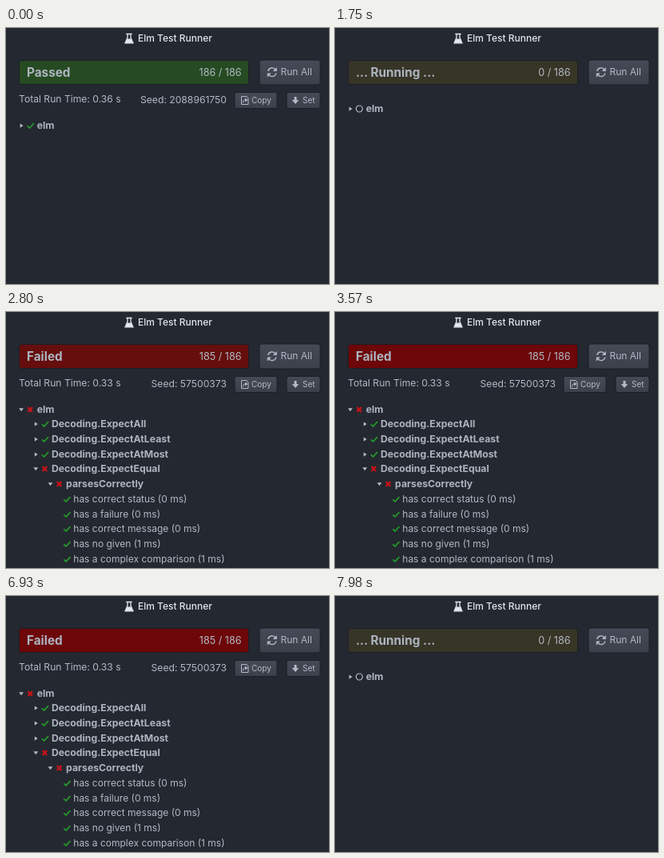
Recreate the animation shown at these times as an HTML page. Size 404 px wide and 320 px high, loop 8 s.

```html
<!DOCTYPE html>
<html lang="en">
<head>
<meta charset="utf-8">
<title>Elm Test Runner</title>
<style>
  html, body { margin: 0; width: 100%; height: 100%; overflow: hidden; background: #242830; }
  svg { display: block; width: 404px; height: 320px; }
  text { font: 12px Inter, sans-serif; fill: #b3b9c5; white-space: pre; }
  .bold { font-size: 12.25px; font-weight: 700; fill: #adb4c0; }
  .status { font-size: 15.3px; font-weight: 700; fill: #adb4c0; }
  .count { font-size: 12.6px; }
  .info { font-size: 12.15px; }
  .small { font-size: 10px; }
  .end { text-anchor: end; }
  .line { fill: none; stroke: #b3b9c5; stroke-width: 1.4; }
  .fill { fill: #b3b9c5; }
  .btn, #bar { stroke: #1b1e25; stroke-width: 1; }
  .btn { fill: url(#face); }
  .pass { fill: none; stroke: #24982b; stroke-width: 1.8; }
  .fail { fill: none; stroke: #c2141a; stroke-width: 2.4; }
</style>
</head>
<body>
<svg viewBox="0 0 404 320">
  <defs>
    <linearGradient id="face" x2="0" y2="1">
      <stop offset="0" stop-color="#454a56"/>
      <stop offset="1" stop-color="#3b404b"/>
    </linearGradient>
  </defs>
  <rect width="404" height="320" fill="#242830"/>

  <g fill="none" stroke="#e4e7ec" stroke-width="1.3">
    <path d="M150.3 7.5h7.4M152 7.5v4.5l-2.9 6.8h9.8l-2.9-6.8v-4.5"/>
    <path d="M151.4 13.5h5.2l2.2 5.2h-9.6z" fill="#e4e7ec" stroke="none"/>
  </g>
  <text x="165" y="17" style="fill:#e4e7ec;font-weight:500">Elm Test Runner</text>

  <rect id="bar" x="16.5" y="40.5" width="287" height="30" rx="3"/>
  <text id="status" class="status" x="26" y="61"></text>
  <text id="count" class="count end" x="294.6" y="59.5"></text>

  <rect class="btn" x="317" y="40" width="76" height="31" rx="3"/>
  <path class="line" d="M327.8 54a5 5 0 0 1 9-2M337.8 56.5a5 5 0 0 1-9 2"/>
  <path class="fill" d="M338.8 49v5h-5zM326.8 61.5v-5h5z"/>
  <text x="343.5" y="59.3">Run All</text>

  <g id="info">
    <text id="time" class="info" x="16" y="93"></text>
    <text id="seed" class="info end" x="276" y="94"></text>
    <rect class="btn" x="286" y="80.5" width="53" height="20" rx="2.5"/>
    <path class="line" style="stroke-width:1" d="M301 85.5h-6.5v10h8.5v-7.5zM296.5 93.5c0-3 1-3.5 3-3.5"/>
    <path class="fill" d="M299 87.5l3.5 2.5-3.5 2.5z"/>
    <text class="small" x="307" y="94">Copy</text>
    <rect class="btn" x="351" y="80.5" width="42" height="20" rx="2.5"/>
    <path class="fill" d="M360.5 86h3v4h2.8l-4.3 5-4.3-5h2.8z"/>
    <text class="small" x="371" y="94">Set</text>
  </g>
  <g id="tree"></g>
</svg>
<script>
const $ = id => document.getElementById(id);
const LOOP = 8000, FADE = 500;
const GREEN = [38, 75, 34], OLIVE = [55, 53, 38], RED = [109, 7, 9];

const ICONS = {
  pass: '<path class="pass" d="M.8 .3L3.7 3L9-2.8"/>',
  fail: '<path class="fail" d="M1.6-2.8L7.2 2.9M7.2-2.8L1.6 2.9"/>',
  wait: '<circle class="line" style="stroke-width:1.2" cx="4.6" r="4"/>'
};
const ARROWS = { open: 'M16.2-1.8h5.8l-2.9 4z', shut: 'M17.6-2.6l4 2.7l-4 2.7z' };

// row: [level, icon, label, arrow]
const row = ([level, icon, label, arrow], y) => {
  const x = level * 18.2;
  const mark = arrow ? `<path class="fill" d="${ARROWS[arrow]}"/>` : '';
  const dx = arrow ? 0 : -9;
  return `<g transform="translate(${x} ${y})">${mark}
    <g transform="translate(${25.8 + dx} 0)">${ICONS[icon]}</g>
    <text x="${38.7 + dx}" y="4" class="${arrow ? 'bold' : ''}">${label}</text></g>`;
};
const tree = (rows, top) => rows.map((r, i) => row(r, Math.round(top + i * 18.7))).join('');

const leaves = [
  'has correct status (0 ms)', 'has a failure (0 ms)', 'has correct message (0 ms)',
  'has no given (1 ms)', 'has a complex comparison (1 ms)'
];
const failedTree = tree([
  [0, 'fail', 'elm', 'open'],
  ...['All', 'AtLeast', 'AtMost'].map(s => [1, 'pass', 'Decoding.Expect' + s, 'shut']),
  [1, 'fail', 'Decoding.ExpectEqual', 'open'],
  [2, 'fail', 'parsesCorrectly', 'open'],
  ...leaves.map(s => [3, 'pass', s])
], 121.6);

const running = {
  status: '... Running ...', count: '0 / 186', color: OLIVE,
  tree: tree([[0, 'wait', 'elm', 'shut']], 101)
};
const passed = {
  status: 'Passed', count: '186 / 186', color: GREEN, time: '0.36', seed: '2088961750',
  tree: tree([[0, 'pass', 'elm', 'shut']], 121.6)
};
const failed = {
  status: 'Failed', count: '185 / 186', color: RED, time: '0.33', seed: '57500373',
  tree: failedTree
};
const scenes = [
  { at: 0, view: passed, from: GREEN },
  { at: 70, view: running, from: GREEN },
  { at: 2520, view: failed, from: OLIVE },
  { at: 7280, view: running, from: RED }
];

// cubic-bezier(.25, .1, .25, 1)
function ease(p) {
  if (p <= 0 || p >= 1) return p <= 0 ? 0 : 1;
  const curve = (a, b, u) => 3 * a * u * (1 - u) ** 2 + 3 * b * u * u * (1 - u) + u ** 3;
  let lo = 0, hi = 1;
  for (let i = 0; i < 20; i++) {
    const mid = (lo + hi) / 2;
    if (curve(.25, .25, mid) < p) lo = mid; else hi = mid;
  }
  return curve(.1, 1, lo);
}

let shown;
function show(view) {
  if (view === shown) return;
  shown = view;
  $('status').textContent = view.status;
  $('count').textContent = view.count;
  $('tree').innerHTML = view.tree;
  $('info').style.display = view.time ? '' : 'none';
  $('time').textContent = `Total Run Time: ${view.time} s`;
  $('seed').textContent = `Seed: ${view.seed}`;
}

function draw(t) {
  const { at, view, from } = scenes.findLast(s => t >= s.at);
  const k = ease((t - at) / FADE);
  const mix = from.map((c, i) => Math.round(c + (view.color[i] - c) * k));
  show(view);
  $('bar').setAttribute('fill', `rgb(${mix})`);
}

const start = performance.now();
function tick() {
  draw((performance.now() - start) % LOOP);
  requestAnimationFrame(tick);
}
tick();
</script>
</body>
</html>
```
